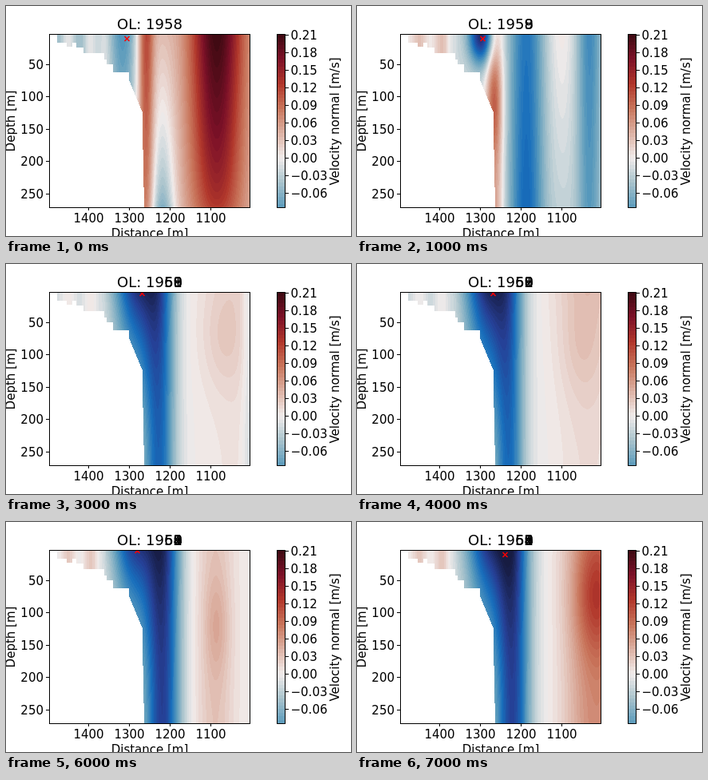
Write an HTML page with a canvas that moves like this. It is 432 by 288 pixels and loops after 8 s.

```html
<!DOCTYPE html>
<html lang="en">
<head>
<meta charset="utf-8">
<title>Velocity section</title>
<style>
  html, body { margin: 0; width: 100%; height: 100%; overflow: hidden; background: #fff; }
  canvas { display: block; }
</style>
</head>
<body>
<canvas id="stage" width="432" height="288"></canvas>
<script>
const ctx = document.getElementById('stage').getContext('2d');
const FONT = '"DejaVu Sans", sans-serif';
const LEFT = 54, TOP = 36, WIDTH = 251, HEIGHT = 216;
const STEP_MS = 1000, FIRST_YEAR = 1958;
const BAND = 6, LIMIT = 210; // velocities in mm/s

const palette = ['#171c42', '#263e94', '#176ebc', '#5b9bbc', '#a9c3cc', '#f1eceb',
  '#dcb2a4', '#c9765c', '#b1372b', '#7d1128', '#3c0911']
  .map(hex => [1, 3, 5].map(i => parseInt(hex.slice(i, i + 2), 16)));

const clamp = (v, lo, hi) => Math.min(hi, Math.max(lo, v));
const lerp = (a, b, k) => a + (b - a) * k;
const bell = d => Math.exp(-d * d);

function colorOf(velocity) {
  const mid = (Math.floor(velocity / BAND) + 0.5) * BAND;
  const p = clamp(mid / LIMIT + 1, 0, 2) * 5;
  const i = Math.min(9, Math.floor(p));
  return palette[i].map((c, n) => Math.round(lerp(c, palette[i + 1][n], p - i)));
}

// Terraces on the shelf as [x, y], then a slope that drops off steeply.
const terraces = [[64, 46], [76, 51], [83, 46], [88, 52], [97, 59], [123, 67], [126, 73], [134, 83]];

function floorAt(x) {
  if (x < 64) return TOP;
  if (x < 154) return terraces.findLast(t => x >= t[0])[1];
  return Math.min(TOP + HEIGHT, Math.round(94 + 2.4 * (x - 154) + 45 * Math.max(0, x - 170)));
}

// A current keeps its place and changes strength from surface to bottom.
const current = (x, width, surface, bottom) => (px, py, fade) =>
  lerp(bottom, surface, fade) * bell((px - x) / width);

// A core is strongest at one depth.
const core = (x, y, width, height, strength) => (px, py) =>
  strength * bell((px - x) / width) * bell((py - y) / height);

// Rippled shelf water in the west, the sum of all flows offshore.
const section = (shelf, ripple, base, decay, ...flows) => (x, y) => {
  const fade = Math.pow(1 - (y - TOP) / HEIGHT, decay);
  const west = shelf + ripple * Math.cos((x - 106) * Math.PI / 14);
  const offshore = flows.reduce((sum, flow) => sum + flow(x, y, fade), base);
  return lerp(west, offshore, clamp((x - 110) / 16, 0, 1));
};

const mean = (f, g) => (x, y) => (f(x, y) + g(x, y)) / 2;

const s1958 = section(-28, 20, 30, 0.7,
  current(146, 22, -120, -30), current(175, 10, 105, 65),
  current(196, 16, 0, -98), current(264, 34, 180, 92));
const s1959 = section(18, 14, -20, 1,
  core(156, 36, 16, 36, -175), current(173, 11, 75, 75), core(171, 125, 10, 60, 50),
  current(212, 22, -98, -112), current(256, 18, 25, -5), current(291, 16, -80, -65));
const s1960 = section(0, 8, 2, 2,
  current(164, 30, -155, -15), current(193, 20, -135, -140),
  core(268, 88, 28, 65, 22), current(305, 9, -50, -42));
const s1962 = section(-10, 10, -5, 1.5,
  current(164, 30, -178, -10), current(190, 19, -85, -122),
  current(290, 45, 40, 18), core(278, 105, 24, 55, 8));
const s1964 = section(12, 14, 0, 2,
  current(160, 28, -158, -20), current(196, 22, -172, -164),
  current(262, 24, 28, 30), core(264, 130, 15, 62, 21));
const s1965 = section(14, 12, -8, 2,
  current(165, 29, -155, -20), current(195, 21, -148, -150),
  current(300, 42, 80, 78), core(300, 92, 28, 75, 58));

const years = [
  { field: s1958, mark: [151, 41] },
  { field: s1959, mark: [157, 41] },
  { field: s1960, mark: [170, 37] },
  { field: mean(s1960, s1962), mark: [170, 37] },
  { field: s1962, mark: [170, 37] },
  { field: mean(s1962, s1964), mark: [167, 37] },
  { field: s1964, mark: [164, 36] },
  { field: s1965, mark: [185, 41] }
];

function renderField(field) {
  const layer = document.createElement('canvas');
  layer.width = WIDTH;
  layer.height = HEIGHT;
  const layerCtx = layer.getContext('2d');
  const image = layerCtx.createImageData(WIDTH, HEIGHT);
  for (let i = 0; i < WIDTH; i++) {
    const x = LEFT + i, depth = floorAt(x) - TOP;
    for (let j = 0; j < depth; j++) {
      image.data.set([...colorOf(field(x + 0.5, TOP + j + 0.5)), 255], (j * WIDTH + i) * 4);
    }
  }
  layerCtx.putImageData(image, 0, 0);
  return layer;
}

function text(str, x, y, align = 'center', size = 15) {
  ctx.font = `${size}px ${FONT}`;
  ctx.textAlign = align;
  ctx.fillStyle = '#000';
  ctx.fillText(str, x, y);
}

function verticalText(str, x, y) {
  ctx.save();
  ctx.translate(x, y);
  ctx.rotate(-Math.PI / 2);
  text(str, 0, 0);
  ctx.restore();
}

function frame(x, width) {
  ctx.strokeStyle = '#000';
  ctx.lineWidth = 1;
  ctx.strokeRect(x + 0.5, TOP - 0.5, width, HEIGHT + 1);
}

function drawAxes() {
  frame(LEFT, WIDTH);
  for (let i = 0; i < 4; i++) {
    const x = 103 + i * 51;
    text(String(1400 - i * 100), x + 0.5, 271);
    ctx.fillRect(x, 252, 1, 4);
  }
  for (let i = 0; i < 5; i++) {
    const y = Math.round(73 + i * 40.4);
    text(String(50 + i * 50), 47, y + 6, 'right');
    ctx.fillRect(50, y, 4, 1);
  }
  text('Distance [m]', 180, 289.5);
  verticalText('Depth [m]', 10.5, 144);
}

function drawColorbar() {
  const bandHeight = HEIGHT / 49;
  for (let i = 0; i < 49; i++) {
    ctx.fillStyle = `rgb(${colorOf(LIMIT - (i + 0.5) * BAND)})`;
    const y = Math.round(TOP + i * bandHeight);
    ctx.fillRect(339, y, 11, Math.round(TOP + (i + 1) * bandHeight) - y);
  }
  frame(339, 10);
  for (let i = 0; i < 10; i++) {
    const value = 0.21 - i * 0.03;
    const y = Math.round(35.5 + i * 5 * bandHeight);
    text((value < -0.01 ? '\u2212' : '') + Math.abs(value).toFixed(2), 356.5, y + 5.5, 'left');
    ctx.fillRect(350, y, 4, 1);
  }
  verticalText('Velocity normal [m/s]', 417, 144.5);
}

function drawMark([x, y]) {
  ctx.save();
  ctx.beginPath();
  ctx.rect(LEFT, TOP, WIDTH, HEIGHT);
  ctx.clip();
  ctx.strokeStyle = '#f00';
  ctx.lineWidth = 1.5;
  ctx.beginPath();
  for (const d of [-3, 3]) {
    ctx.moveTo(x + 0.5 - d, y - 3);
    ctx.lineTo(x + 0.5 + d, y + 3);
  }
  ctx.stroke();
  ctx.restore();
}

// Titles pile up over the years; each distinct glyph is inked once.
function drawTitle(index) {
  const titles = years.slice(0, index + 1).map((_, i) => `OL: ${FIRST_YEAR + i}`);
  ctx.font = `18px ${FONT}`;
  const left = 180 - ctx.measureText(titles[0]).width / 2;
  for (let n = 0; n < titles[0].length; n++) {
    const x = left + ctx.measureText(titles[0].slice(0, n)).width;
    for (const glyph of new Set(titles.map(t => t[n]))) text(glyph, x, 29, 'left', 18);
  }
}

const layers = years.map(year => renderField(year.field));

function draw(index) {
  ctx.fillStyle = '#fff';
  ctx.fillRect(0, 0, 432, 288);
  ctx.drawImage(layers[index], LEFT, TOP);
  drawMark(years[index].mark);
  drawAxes();
  drawColorbar();
  drawTitle(index);
}

const start = performance.now();
function tick() {
  const elapsed = Math.max(0, performance.now() - start);
  draw(Math.floor(elapsed / STEP_MS) % years.length);
  requestAnimationFrame(tick);
}
tick();
</script>
</body>
</html>
```
